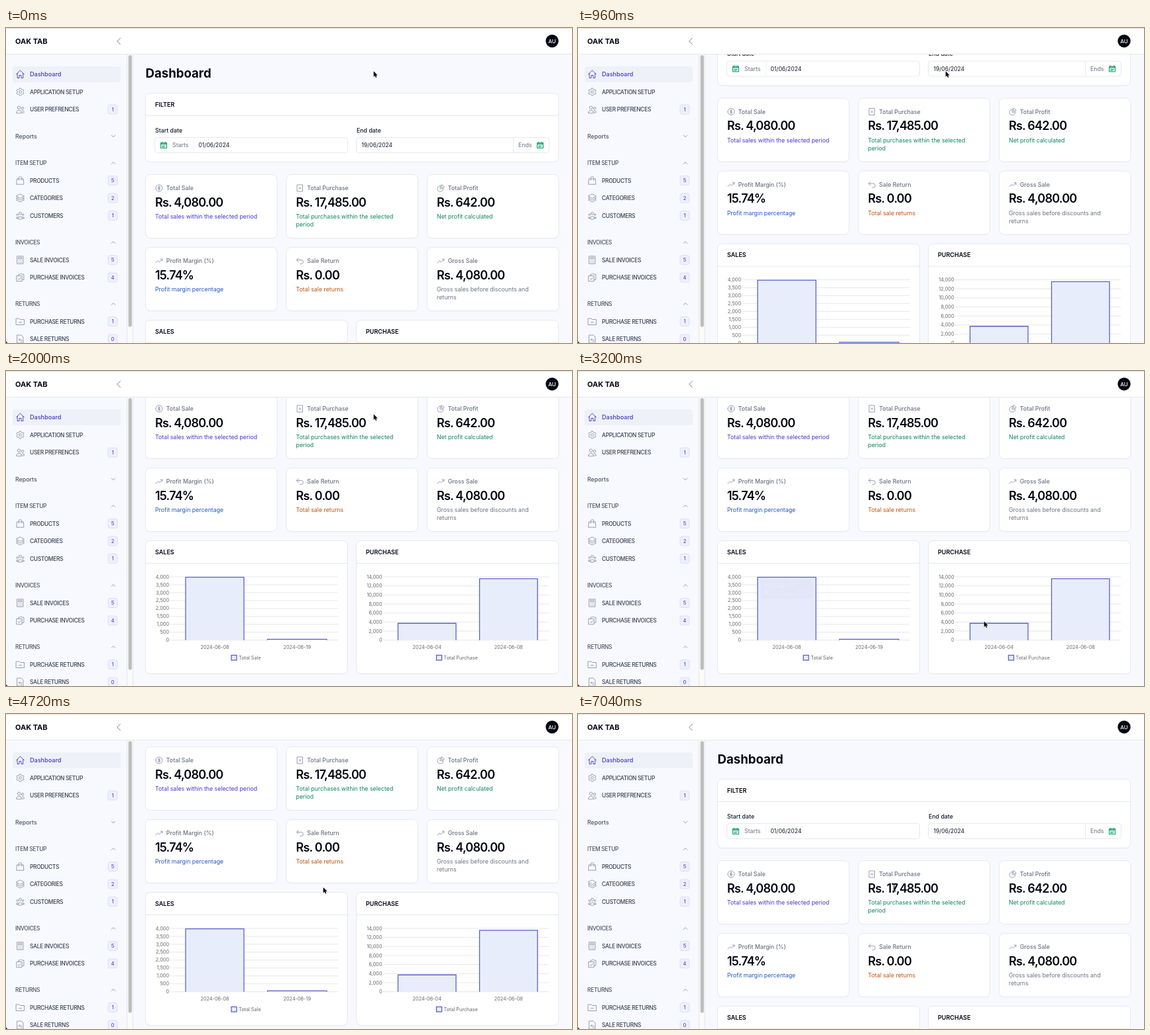
Write an HTML page that moves like this. It is 854 by 476 pixels and loops after 7.12 s.

```html
<!DOCTYPE html>
<html lang="en">
<head>
<meta charset="utf-8">
<title>Dashboard</title>
<style>
  html, body { margin: 0; width: 100%; height: 100%; overflow: hidden; background: #f8f9fe; }
  svg { display: block; }
  text { font: 400 8.8px Inter, "Open Sans", sans-serif; fill: #111827; white-space: pre; }
  .title { font-size: 18.6px; font-weight: 700; fill: #030712; }
  .brand { font-size: 11px; font-weight: 700; fill: #030712; }
  .head { font-size: 9px; font-weight: 600; fill: #030712; }
  .label { font-weight: 500; }
  .nav { font-weight: 500; fill: #374151; }
  .caps { font-size: 8.4px; letter-spacing: -.3px; }
  .group { fill: #4b5563; }
  .active { font-size: 9.1px; fill: #4338ca; }
  .badge { font-size: 7.5px; font-weight: 500; fill: #4f46e5; text-anchor: middle; }
  .stat { font-weight: 500; fill: #6b7280; }
  .value { font-size: 18px; font-weight: 600; letter-spacing: -.8px; fill: #030712; }
  .date { font-size: 8.5px; }
  .muted { fill: #6b7280; }
  .tick { font-size: 7.3px; fill: #666; }
  .tip { font-size: 7.3px; fill: #fff; }
  .bold { font-weight: 700; }
  .mid { text-anchor: middle; }
  .end { text-anchor: end; }
  .icon { fill: none; stroke: #8d95a5; stroke-width: .9; stroke-linecap: round; stroke-linejoin: round; }
  .card { fill: #fff; stroke: #e6e8ee; }
  .line { stroke: #e5e7eb; }
  .bar { fill: #e8edfb; stroke: #5b60cc; stroke-width: 1.3; }
</style>
</head>
<body>
<svg id="stage" width="854" height="476" viewBox="0 0 854 476"></svg>
<script>
const LOOP = 7120, STEP = 80;
const INDIGO = '#4338ca', GREEN = '#0a8560', BLUE = '#2456cc', ORANGE = '#c2510c', GRAY = '#6b7280';

const text = (x, y, s, cls = '', fill) =>
  `<text x="${x}" y="${y}" class="${cls}"${fill ? ` style="fill:${fill}"` : ''}>${s}</text>`;
const rect = (x, y, w, h, r, attrs) =>
  `<rect x="${x}" y="${y}" width="${w}" height="${h}" rx="${r}" ${attrs}/>`;
const line = (x1, y1, x2, y2) => `<path class="line" d="M${x1} ${y1}L${x2} ${y2}"/>`;
const card = (x, y, w, h, r = 7) =>
  rect(x, y + .7, w, h, r, 'fill="#eef0f5"') + rect(x, y, w, h, r, 'class="card"');

// Outline icons, drawn around their own centre.
const ICONS = {
  home: 'M-6 0L0-6 6 0M-4.3-1.6V5.5H-1.5V1.5H1.5V5.5H4.3V-1.6',
  gear: 'M-1-5.5H1L1.5-4 3-3.2 4.5-3.6 5.6-1.8 4.4-.8V.8L5.6 1.8 4.5 3.6 3 3.2 1.5 4 1 5.5H-1L-1.5 4-3 3.2-4.5 3.6-5.6 1.8-4.4.8V-.8L-5.6-1.8-4.5-3.6-3-3.2-1.5-4ZM-1.9 0a1.9 1.9 0 1 0 3.8 0a1.9 1.9 0 1 0-3.8 0',
  users: 'M-4.2-2.8a2.2 2.2 0 1 0 4.4 0a2.2 2.2 0 1 0-4.4 0M-6 5.2a4 4 0 0 1 8 0Q-2 6.8-6 5.2M1.7-1.7a1.8 1.8 0 1 0 3.6 0a1.8 1.8 0 1 0-3.6 0M2.6 2.1Q5.5 1 6 4.6Q4.5 5.4 2.4 5.2',
  bag: 'M-4.8-2.5H4.8L5.4 5.7H-5.4ZM-2.4-.4V-3.5a2.4 2.4 0 0 1 4.8 0V-.4',
  stack: 'M0-6L6-2.8 0 .4-6-2.8ZM-3.8-1.4L-6 0 0 3.2 6 0 3.8-1.4M-3.8 1.4L-6 2.8 0 6 6 2.8 3.8 1.4',
  people: 'M-1.9-3.3a1.9 1.9 0 1 0 3.8 0a1.9 1.9 0 1 0-3.8 0M-3.2 5a3.2 3.6 0 0 1 6.4 0Q0 6.4-3.2 5M-5.4-1.4a1.3 1.3 0 1 0 2.6 0a1.3 1.3 0 1 0-2.6 0M2.8-1.4a1.3 1.3 0 1 0 2.6 0a1.3 1.3 0 1 0-2.6 0M-3.3 2Q-6 1.2-6 4H-3.4M3.3 2Q6 1.2 6 4H3.4',
  calc: 'M-4.5-5.7H4.5V5.7H-4.5ZM-2.5-3.7H2.5V-1.7H-2.5ZM-2.5.6h.1M0 .6h.1M2.4.6h.1M-2.5 2.3h.1M0 2.3h.1M2.4 2.3h.1M-2.5 4h.1M0 4h.1M2.4 4h.1',
  clip: 'M-2.5-2.5V-4.8H-.6Q1.2-7 3-4.8H5.4V3.3H2.8M-5.3-2.5H2.6V5.8H-5.3ZM-3.2 2L-1.8 3.3.7.2',
  folder: 'M-6-4.5H-1.5L0-3H6V5H-6ZM-2 1.2H2',
  undoDoc: 'M-4.5-6H1.5L4.5-3V6H-4.5ZM-2 1H1a1.5 1.5 0 0 1 0 3M-2 1L-.6-.4M-2 1L-.6 2.4',
  dollar: 'M-5 0a5 5 0 1 0 10 0a5 5 0 1 0-10 0M1.6-1.5Q0-2.9-1.4-1.5T0 0T1.4 1.5T-1.6 1.5M0-3V3',
  xDoc: 'M-4-5H4V5H-4ZM-1.5-1.5L1.5 1.5M1.5-1.5L-1.5 1.5',
  pie: 'M-.8-3.8A4.4 4.4 0 1 0 3.8.8H-.8ZM1-5V-1H5A4 4 0 0 0 1-5',
  trend: 'M-5 3L-1.8-.3.3 1.7 5-2.7M2.2-3L5-2.7 4.6.1',
  back: 'M-2-4.5L-5-1.5-2 1.5M-5-1.5H2a3 3 0 0 1 0 6H.5',
  calendar: 'M-4.5-3.4H4.5V4.5H-4.5ZM-4.5-1.6H4.5M-2.4-4.8V-3M2.4-4.8V-3M-2.5 1H2.5M-2.5 2.8H1',
  up: 'M-2.8 1.4L0-1.4 2.8 1.4',
  down: 'M-2.8-1.4L0 1.4 2.8-1.4',
  left: 'M2.5-4.8L-2.3 0 2.5 4.8',
};
const icon = (name, x, y, attrs = '') =>
  `<path class="icon" transform="translate(${x} ${y})" d="${ICONS[name]}" ${attrs}/>`;

const NAV = [
  [96.5, 'gear', 'APPLICATION SETUP'], [123, 'users', 'USER PREFRENCES', 1],
  [230.5, 'bag', 'PRODUCTS', 5], [257, 'stack', 'CATEGORIES', 2], [283.5, 'people', 'CUSTOMERS', 1],
  [350.5, 'calc', 'SALE INVOICES', 5], [377, 'clip', 'PURCHASE INVOICES', 4],
  [443.5, 'folder', 'PURCHASE RETURNS', 1], [470, 'undoDoc', 'SALE RETURNS', 0],
];
const GROUPS = [[204, 'ITEM SETUP'], [324, 'INVOICES'], [417, 'RETURNS']];

function sidebar() {
  const items = NAV.map(([y, glyph, name, count]) =>
    icon(glyph, 21.5, y) + text(36, y + 3, name, 'nav caps') +
    (count === undefined ? '' :
      rect(154, y - 7, 14, 14, 3, 'fill="#eef0ff" stroke="#d6d9fb" stroke-width=".8"') +
      text(161, y + 2.7, count, 'badge')));
  const groups = GROUPS.map(([y, name]) =>
    text(14, y + 3, name, 'nav caps group') + icon('up', 162, y));
  return rect(0, 39, 192, 450, 0, 'fill="#f8f9fe"') +
    rect(10, 58, 163, 24, 4, 'fill="#eff1f8"') +
    icon('home', 21.5, 70, 'style="stroke:#4338ca"') + text(36, 73, 'Dashboard', 'nav active') +
    items.join('') + groups.join('') +
    text(14, 166.5, 'Reports', 'nav group') + icon('down', 162, 163.5) +
    rect(183, 39, 8.5, 450, 0, 'fill="#fafafa"') + line(182.5, 39, 182.5, 480) + line(191.5, 39, 191.5, 480) +
    rect(184.7, 41, 5.2, 410.5, 2.6, 'fill="#bdbdbd"');
}

const header = () =>
  rect(0, 0, 854, 39, 0, 'fill="#fff"') + line(0, 39.5, 854, 39.5) +
  text(14, 24, 'OAK TAB', 'brand') + icon('left', 170, 20, 'style="stroke:#6b7280"') +
  '<circle cx="824" cy="19.7" r="9.7" fill="#030712"/>' +
  '<text x="824" y="22.6" class="mid" style="font-size:8px;font-weight:500;fill:#fff">AU</text>';

const filter = () =>
  card(210.5, 98.5, 623, 104) + text(225, 118.5, 'FILTER', 'head') + line(211, 132.5, 833, 132.5) +
  text(225, 157.5, 'Start date', 'label') + text(529, 157.5, 'End date', 'label') +
  rect(224.5, 165.5, 291, 23, 4, 'class="card"') + rect(528.5, 165.5, 291, 23, 4, 'class="card"') +
  icon('calendar', 238, 177, 'style="stroke:#0f9f6e;stroke-width:1.1"') +
  text(251, 180, 'Starts', 'muted') +
  '<path d="M283.5 166V188" stroke="#f1f2f5"/>' +
  text(290.5, 180.2, '01/06/2024', 'date') + text(536.5, 180.2, '19/06/2024', 'date') +
  line(765.5, 166, 765.5, 188) + text(773, 180, 'Ends', 'muted') +
  icon('calendar', 806, 177, 'style="stroke:#0f9f6e;stroke-width:1.1"');

const STATS = [
  ['dollar', 'Total Sale', 'Rs. 4,080.00', INDIGO, 'Total sales within the selected period'],
  ['xDoc', 'Total Purchase', 'Rs. 17,485.00', GREEN, 'Total purchases within the selected', 'period'],
  ['pie', 'Total Profit', 'Rs. 642.00', GREEN, 'Net profit calculated'],
  ['trend', 'Profit Margin (%)', '15.74%', BLUE, 'Profit margin percentage'],
  ['back', 'Sale Return', 'Rs. 0.00', ORANGE, 'Total sale returns'],
  ['trend', 'Gross Sale', 'Rs. 4,080.00', GRAY, 'Gross sales before discounts and', 'returns'],
];
const stats = () => STATS.map(([glyph, name, value, color, ...notes], i) => {
  const x = 210.5 + i % 3 * 212.5, y = 221.5 + (i > 2 ? 110 : 0);
  return card(x, y, 198.5, 96) + icon(glyph, x + 20.5, y + 20.5) +
    text(x + 31.3, y + 23.5, name, 'stat') + text(x + 14.5, y + 48.1, value, 'value') +
    notes.map((note, k) => text(x + 14.5, y + 66.5 + k * 12, note, '', color)).join('');
}).join('');

const TOP = 496, BASE = 591.7;
const CHARTS = [
  { x: 210.5, name: 'SALES', legend: 'Total Sale', legendX: 340, max: 4000, step: 500, left: 247, right: 501,
    bars: [[271, 359, 4000, '2024-06-08'], [394.5, 484, 80, '2024-06-19']] },
  { x: 528.5, name: 'PURCHASE', legend: 'Total Purchase', legendX: 649.5, max: 14000, step: 2000, left: 568.5, right: 819,
    bars: [[591.5, 679, 3820, '2024-06-04'], [714.5, 802, 13665, '2024-06-08']] },
];
const levelY = (value, max) => BASE - value / max * (BASE - TOP);

function chart(c) {
  let out = card(c.x, 441.5, 305, 201) + text(c.x + 14.5, 461.5, c.name, 'head') +
    line(c.x, 475.5, c.x + 305, 475.5);
  for (let v = 0; v <= c.max; v += c.step) {
    const y = levelY(v, c.max);
    out += line(c.left, y, c.right, y) + text(c.left - 1, y + 2.6, v.toLocaleString('en-US'), 'tick end');
  }
  for (const [x1, x2, value, day] of c.bars) {
    out += `<path class="bar" d="M${x1} ${BASE}V${levelY(value, c.max) + .65}H${x2}V${BASE}"/>` +
      text((x1 + x2) / 2, 605, day, 'tick mid');
  }
  return out + rect(c.legendX, 614.5, 8, 7.5, 0, 'class="bar"') +
    text(c.legendX + 11, 621, c.legend, 'tick');
}

const tooltip = (c, i, below) => {
  const [x1, x2, value, day] = c.bars[i], cx = (x1 + x2) / 2, w = c.max > 4000 ? 98 : 78;
  const peak = levelY(value, c.max), y = below ? peak + 5 : peak - 33, x = cx - w / 2;
  const caret = below ? `M${cx} ${peak + 1}l4 4h-8z` : `M${cx} ${peak - 1}l4-4h-8z`;
  return `<g class="tooltip" opacity="0">` + rect(x, y, w, 28, 4, 'fill="#000" fill-opacity=".8"') +
    `<path d="${caret}" fill-opacity=".8"/>` + text(x + 4.5, y + 11, day, 'tip bold') +
    rect(x + 4.5, y + 15.5, 7, 7, 0, 'class="bar"') +
    text(x + 14.5, y + 21.7, `${c.legend}: ${value.toLocaleString('en-US')}`, 'tip') + '</g>';
};

const stage = document.getElementById('stage');
stage.innerHTML =
  '<clipPath id="view"><path d="M192 39H854V500H192Z"/></clipPath>' +
  '<path d="M0 0H854V476H0Z" fill="#f8f9fe"/>' +
  '<g id="page"><g clip-path="url(#view)"><g id="content">' +
  text(210.5, 75.3, 'Dashboard', 'title') + filter() + stats() + CHARTS.map(chart).join('') +
  tooltip(CHARTS[0], 0, true) + tooltip(CHARTS[1], 0, false) + tooltip(CHARTS[1], 1, true) +
  '</g></g>' + sidebar() + header() + '</g>' +
  '<path d="M0 .5H854" stroke="#dcdde0"/><path d="M0 472Q0 476 4 476H0Z"/>' +
  '<g id="cursor"><path id="arrow" d="M0 0V8.4L2 6.6 3.3 9.6 4.7 9 3.4 6.1H6Z" stroke="#fff" stroke-width=".8" paint-order="stroke"/>' +
  '<path id="beam" d="M-3-6Q0-6 0-4V4Q0 6-3 6M3-6Q0-6 0-4V4Q0 6 3 6M-1.3 1.5H1.3" fill="none" stroke="#222" stroke-width=".9"/></g>';

// Tables of [time, value, ...].
const SCROLL = [[240, 0], [320, 6], [400, 6], [960, 115.5], [1120, 142], [1200, 150], [1280, 150],
  [1440, 172], [1680, 185], [4640, 185], [4720, 172], [4800, 80], [4880, -2], [4960, -13],
  [5040, -11], [5120, -7], [5200, -4], [5360, -1], [5520, 0]];
const POINTER = [[2080, 554.7, 65.3], [2400, 440, 220], [2720, 320, 365], [2880, 330, 372], [3040, 470, 380],
  [3200, 612.7, 378.5], [3440, 715, 385], [3680, 752, 370], [3840, 700, 340], [4160, 478.7, 262],
  [5640, 478.7, 262], [5680, 477, 262]];
const TIPS = [
  [[2640, 0], [2800, 1], [2960, 1], [3200, .02], [3280, 0]],
  [[3200, 0], [3360, 1], [3440, 1], [3600, 0]],
  [[3440, 0], [3600, 1], [3760, 1], [4000, 0]],
];

function sample(table, t) {
  const next = table.findIndex(row => row[0] > t);
  if (next === 0) return table[0].slice(1);
  if (next < 0) return table[table.length - 1].slice(1);
  const a = table[next - 1], b = table[next], k = (t - a[0]) / (b[0] - a[0]);
  return a.slice(1).map((v, i) => v + (b[i + 1] - v) * k);
}

const [page, content, cursor, arrow, beam] =
  ['page', 'content', 'cursor', 'arrow', 'beam'].map(id => document.getElementById(id));
const tips = [...document.querySelectorAll('.tooltip')];
const bars = document.querySelectorAll('path.bar');
const hoverBars = [bars[0], bars[2], bars[3]];
const move = (el, x, y) => el.setAttribute('transform', `translate(${x} ${y})`);

function draw(t) {
  const [scroll] = sample(SCROLL, t);
  move(page, 0, Math.max(0, -scroll));
  move(content, 0, -Math.max(0, scroll));
  move(cursor, ...sample(POINTER, t));
  const overText = t >= 5680;
  arrow.style.display = overText ? 'none' : '';
  beam.style.display = overText ? '' : 'none';
  tips.forEach((tip, i) => {
    const [alpha] = sample(TIPS[i], t);
    tip.setAttribute('opacity', alpha);
    hoverBars[i].style.fill = alpha > 0 ? '#e7eafb' : '';
  });
}

const start = performance.now();
function frame() {
  const t = (performance.now() - start) % LOOP;
  draw(Math.floor(t / STEP) * STEP);
  requestAnimationFrame(frame);
}
frame();
</script>
</body>
</html>
```
